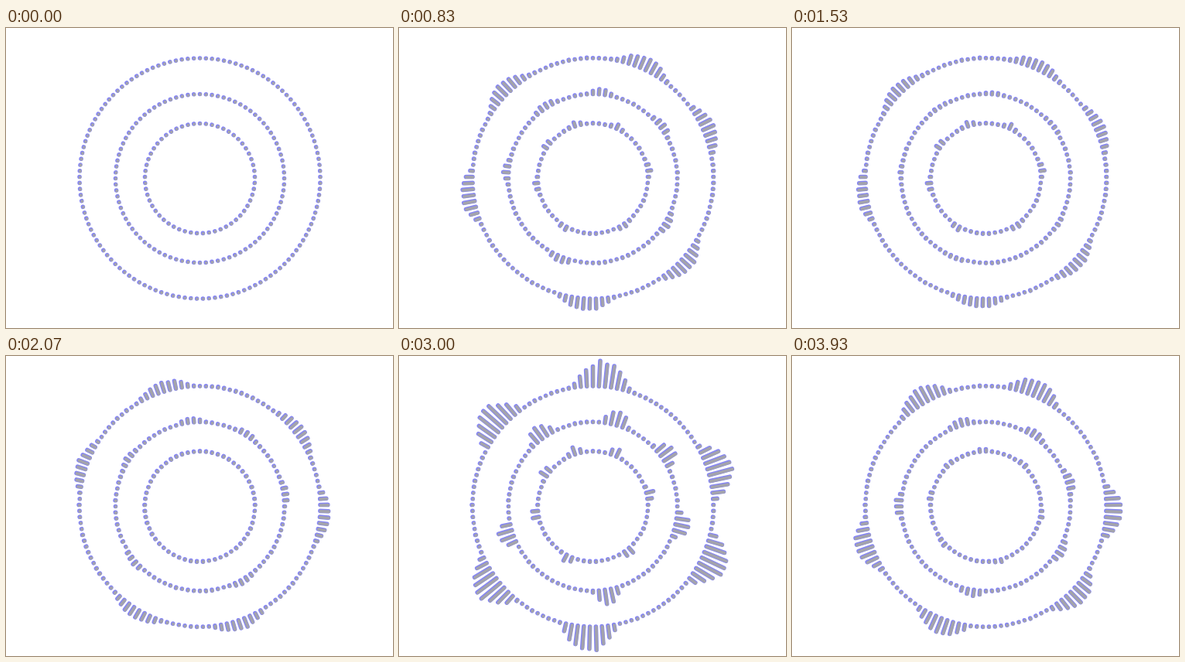
An HTML page with a canvas that plays this animation: 500 px wide and 388 px high, repeating every 3.96 s.

```html
<!DOCTYPE html>
<html lang="en">
<head>
<meta charset="utf-8">
<title>Pulse rings</title>
<style>
  html, body { margin: 0; width: 100%; height: 100%; overflow: hidden; background: #fff; }
  canvas { display: block; }
</style>
</head>
<body>
<canvas id="stage" width="500" height="388"></canvas>
<script>
const ctx = document.getElementById('stage').getContext('2d');
const LOOP = 3960, STEPS = 119, STEP = LOOP / STEPS;
const CX = 250.5, CY = 194.5, SPACING = 7.8;

// Peaks sit in even slots from `start` degrees, pushed off by a wave and a zigzag.
// `pin` 1 keeps the wave still while the peaks turn.
const RINGS = [
  { r: 155.5, peaks: 6, start: 14, wave: 7, lag: 46, zig: 5.7, pin: 0, width: 14, swell: 1 },
  { r: 109, peaks: 6, start: 14, wave: 21, lag: 114, zig: 0, pin: 0, width: 10, swell: .45 },
  { r: 71, peaks: 7, start: 42, wave: 17, lag: 172, zig: 0, pin: .9, width: 8.5, swell: .3 }
];

// Beats of the sound: turn in degrees and peak height of each ring.
const BEATS = [
  { step: 0, turn: -8, heights: [0, 0, 0] },
  { step: 25, turn: 0, heights: [15, 6.5, 5] },
  { step: 46, turn: 0, heights: [11, 2, 5.5] },
  { step: 62, turn: 28, heights: [11.5, 5, 0] },
  { step: 80, turn: 40, heights: [13.5, 13.5, 8] },
  { step: 101, turn: 59, heights: [34, 15, 5] },
  { step: 118, turn: 68, heights: [20, 8, 3.5] }
];

const rad = deg => deg * Math.PI / 180;
const mix = (a, b, u) => a + (b - a) * u;
const hash = (a, b) => {
  const s = Math.sin(a * 12.9898 + b * 78.233) * 43758.5453;
  return s - Math.floor(s);
};

function soundAt(step) {
  let k = 0;
  while (k < BEATS.length - 2 && step >= BEATS[k + 1].step) k++;
  const a = BEATS[k], b = BEATS[k + 1];
  const u = (step - a.step) / (b.step - a.step);
  const lift = (22 - 3 * k) * Math.sin(Math.PI * u) ** 2;
  return {
    turn: mix(a.turn, b.turn, u),
    heights: RINGS.map((ring, i) => mix(a.heights[i], b.heights[i], u) + lift * ring.swell)
  };
}

function peakAngle(ring, i, turn) {
  const slot = i * 360 / ring.peaks;
  const push = ring.wave * Math.cos(rad(slot + ring.lag + ring.pin * turn));
  return slot + ring.start + turn + push + (i % 2 ? -ring.zig : ring.zig);
}

function stroke(path, width, color) {
  ctx.lineWidth = width;
  ctx.strokeStyle = color;
  ctx.stroke(path);
}

function drawRing(ring, id, sound, moving) {
  const angles = Array.from({ length: ring.peaks }, (_, i) => peakAngle(ring, i, sound.turn));
  const count = Math.round(2 * Math.PI * ring.r / SPACING);
  const path = new Path2D();
  for (let i = 0; i < count; i++) {
    const angle = i * 360 / count;
    const gap = Math.min(...angles.map(p => Math.abs((angle - p + 900) % 360 - 180)));
    const near = Math.max(0, 1 - gap / ring.width);
    let h = sound.heights[id] * Math.sin(near * Math.PI / 2) * mix(.85, 1, hash(i, id));
    h += moving * hash(i + 7, id) + .01;
    const x = Math.sin(rad(angle)), y = -Math.cos(rad(angle));
    path.moveTo(CX + x * ring.r, CY + y * ring.r);
    path.lineTo(CX + x * (ring.r + h), CY + y * (ring.r + h));
  }
  stroke(path, 5.6, '#8686f4');
  ctx.save();
  ctx.translate(.5, .5);
  stroke(path, 3.8, '#a3a3ac');
  ctx.restore();
}

function draw(time) {
  const step = Math.min(STEPS - 1, Math.floor((time % LOOP + 4) / STEP));
  const sound = soundAt(step);
  ctx.fillStyle = '#fff';
  ctx.fillRect(0, 0, 500, 388);
  ctx.lineCap = 'round';
  RINGS.forEach((ring, id) => drawRing(ring, id, sound, step > 0));
}

const start = performance.now();
function tick() {
  draw(performance.now() - start);
  requestAnimationFrame(tick);
}
tick();
</script>
</body>
</html>
```
